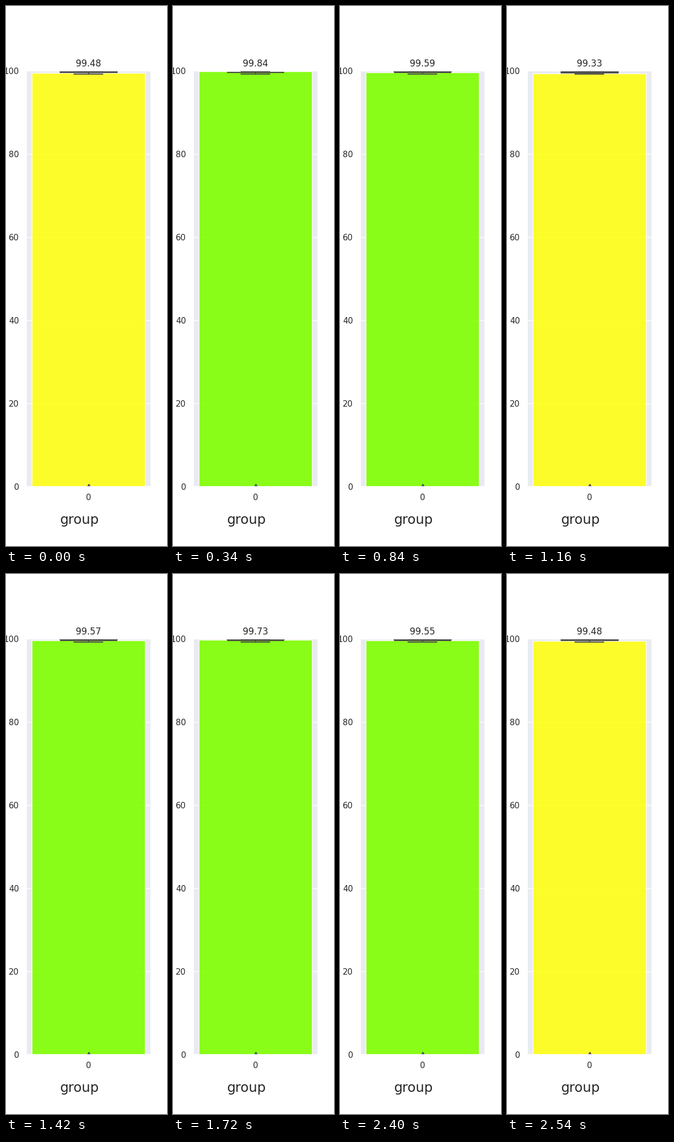
Write a matplotlib script that moves like this. It is 300 px wide and 1000 px high and loops after 2.56 s.

```python
import numpy as np
import matplotlib.pyplot as plt
from matplotlib.animation import FuncAnimation

FRAMES, INTERVAL = 128, 20
CYCLE, PAUSE = 8, 6
INK, LINE, PANEL = "0.15", "#4c4c4c", "#EAEAF2"
YELLOW, GREEN = "#ffff14", "#7fff00"
THRESHOLD = 99.5

# Turning points of the reading: (frame, value)
TURNS = [(0, 99.48), (17, 99.84), (41, 99.59), (57, 99.33), (71, 99.57),
         (81, 99.73), (89, 99.47), (97, 99.60), (105, 99.71), (127, 99.48)]

plt.rcParams.update({
    "font.family": "DejaVu Sans", "text.color": INK,
    "xtick.color": INK, "ytick.color": INK,
    "xtick.labelsize": 11, "ytick.labelsize": 11,
})

fig, ax = plt.subplots(figsize=(3, 10), dpi=100, facecolor="white")
fig.subplots_adjust(left=0.125, right=0.9, bottom=0.11, top=0.88)
ax.set_axisbelow(True)
ax.grid(axis="y", color="white", lw=1)
ax.tick_params(length=0, pad=9.5)
for spine in ax.spines.values():
    spine.set(color="white", linewidth=1.25)

line = dict(color=LINE, lw=1.5)
stats = dict(whislo=99.23, q1=99.49, med=99.63, q3=99.76, whishi=99.85,
             fliers=[0])
# The box lies behind the bar; its median, whiskers and caps lie in front.
ax.bxp([stats], positions=[0], widths=0.4, capwidths=0.2,
       patch_artist=True, manage_ticks=False,
       boxprops=dict(facecolor=LINE, edgecolor=LINE, lw=1.5, zorder=0.9),
       medianprops=line, whiskerprops=line, capprops=line,
       flierprops=dict(marker="d", markersize=5, markerfacecolor=LINE,
                       markeredgecolor=LINE))
bar = ax.bar(0, 0, width=0.8, alpha=0.9, edgecolor="white", lw=1)[0]
ax.set(xlim=(-0.44, 0.44), ylim=(0, 100), facecolor=PANEL,
       xticks=[0], xticklabels=["0"])
ax.text(-0.2, -9, "group", fontsize=18)
title = ax.set_title("", fontsize=12, pad=6)


def reading(frame):
    """Follow the turning points, resting for part of every cycle."""
    step = (frame - 1) % CYCLE
    if step < PAUSE:
        frame -= step
    return round(float(np.interp(frame, *zip(*TURNS))), 2)


def update(frame):
    value = reading(frame)
    bar.set_height(value)
    bar.set_facecolor(GREEN if value >= THRESHOLD else YELLOW)
    title.set_text(str(value))
    return bar, title


anim = FuncAnimation(fig, update, frames=FRAMES, interval=INTERVAL,
                     repeat=True, repeat_delay=0, blit=False)
plt.show()
```
